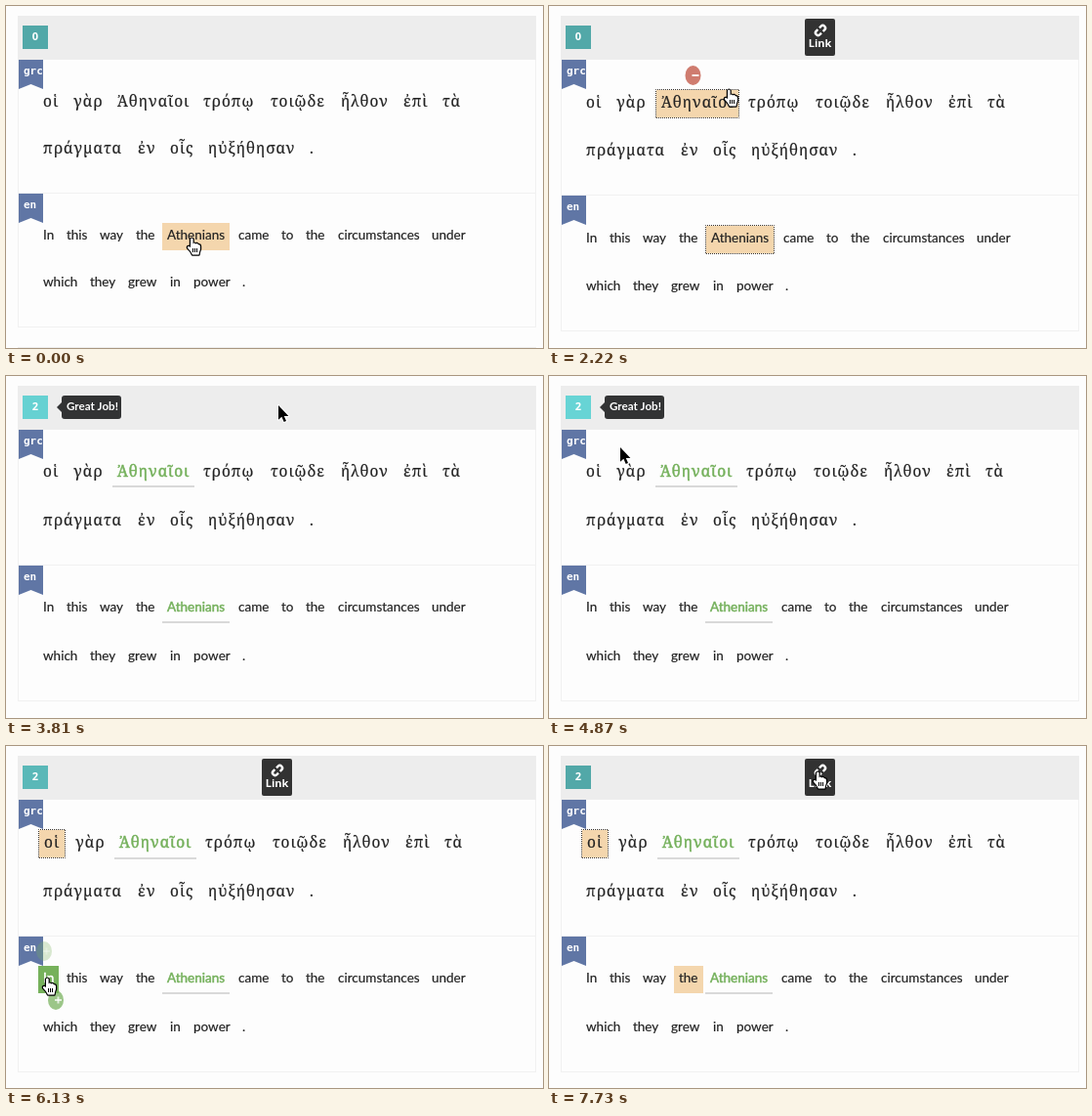
An HTML page with a canvas that plays this animation: 550x350 px, repeating every 8000 ms.

```html
<!DOCTYPE html>
<html lang="en">
<head>
<meta charset="utf-8">
<style>
html, body { margin: 0; overflow: hidden; background: #fdfdfd; }
canvas { display: block; }
</style>
</head>
<body>
<canvas id="stage" width="550" height="350"></canvas>
<script>
const c = document.getElementById('stage').getContext('2d');
const LOOP = 8000, STEP = LOOP / 90;
const TAN = '#f4d6ad', GREEN = '#76b15b', RED = '#c8695a', INK = '#222';
const GREEK = '15.4px "Noto Serif", serif', LATIN = '13.5px Lato, sans-serif';

const lines = (...rows) => rows.flatMap((row, line) =>
  row.split(' ').map(s => { const [x, text] = s.split(':'); return { x: +x, text, line }; }));
const grc = lines('38:οἱ 69:γὰρ 114:Ἀθηναῖοι 202:τρόπῳ 271:τοιῷδε 343:ἦλθον 407:ἐπὶ 447:τὰ',
  '38:πράγματα 135:ἐν 168:οἷς 207:ηὐξήθησαν 311:.');
const en = lines('38:In 62:this 96:way 133:the 165:Athenians 238:came 282:to 307:the 340:circumstances 436:under',
  '38:which 86:they 125:grew 168:in 192:power 242:.');
const people = grc[2], oi = grc[0], inWord = en[0], the = en[3], athenians = en[4], which = en[10];

// word, style, start, end
const marks = [
  [athenians, 'tan', 0, 175], [athenians, 'sel', 175, 3005], [athenians, 'linked', 3005, LOOP],
  [people, 'green', 890, 1600], [people, 'sel', 1600, 3005], [people, 'linked', 3005, LOOP],
  [oi, 'tan', 4960, 5315], [oi, 'sel', 5315, LOOP],
  [which, 'green', 5680, 6030], [inWord, 'green', 6030, 6330],
  [the, 'green', 6560, 6910], [the, 'tan', 6910, LOOP]
];
// word, sign, start, end
const badges = [
  [athenians, '-', 175, 720], [people, '+', 880, 1600], [people, '-', 1600, 2220],
  [oi, '-', 5315, 5600], [which, '+', 5680, 6080], [inWord, '+', 6050, 6290],
  [the, '+', 6560, 6910], [the, '-', 6910, 7020]
];
// time, x, y of the pointer tip
const path = [
  [0, 190, 237], [640, 190, 237], [980, 130, 93], [1260, 131, 93], [1340, 137, 95],
  [2140, 137, 95], [2480, 303, 60], [2660, 279, 32], [3010, 279, 32], [3100, 279, 30],
  [3990, 279, 30], [4510, 77, 70], [4780, 77, 70], [5050, 43, 95], [5430, 43, 95],
  [5615, 55, 266], [5790, 58, 291], [5970, 52, 280], [6130, 42, 237], [6230, 42, 237],
  [6430, 34, 94], [6600, 136, 252], [6740, 140, 236], [7000, 140, 236], [7460, 288, 56],
  [7640, 281, 39], [7730, 275, 26]
];
const arrowTimes = [[3090, 4960], [5490, 5680], [6500, 6560]];
const arrow = new Path2D('M0 0V14.8L3.4 11.8L5.7 17L8 16L5.8 11H10.4Z');
const hand = new Path2D('M4 10V1.6Q5.3 -.4 6.6 1.6V6.5Q7.4 4.8 9.3 6.4Q11.2 5.4 11.8 7.2Q14 6.8 14 9V12Q13 14 12.5 17.5H6Q5 14.5 1 10.7Q.5 8.5 2.4 9Z');

const clamp = v => Math.max(0, Math.min(1, v));
const ramp = (t, a, b) => clamp((t - a) / (b - a));
const during = (t, a, b) => t >= a && t < b;

function rect(x, y, w, h, color, r = 0) {
  c.fillStyle = color;
  c.beginPath();
  c.roundRect(x, y, w, h, r);
  c.fill();
}

function label(text, x, y, font, color, align = 'left', weight = 0) {
  c.font = font;
  c.textAlign = align;
  c.fillStyle = c.strokeStyle = color;
  c.fillText(text, x, y);
  if (weight) { c.lineWidth = weight; c.strokeText(text, x, y); }
}

function pointer(t) {
  const i = path.findIndex(p => p[0] > t);
  if (i < 0) return path[path.length - 1].slice(1);
  const [a, x, y] = path[i - 1], [b, x2, y2] = path[i];
  const k = ramp(t, a, b);
  return [x + (x2 - x) * k, y + (y2 - y) * k];
}

function flag(y, text) {
  c.fillStyle = '#6076a5';
  c.beginPath();
  [[13, 0], [38, 0], [38, 30], [25.5, 25], [13, 30]].forEach(([x, dy]) => c.lineTo(x, y + dy));
  c.fill();
  c.save();
  c.beginPath();
  c.rect(13, y, 25, 30);
  c.clip();
  label(text, 18, y + 14.5, 'bold 11px "DejaVu Sans Mono", monospace', '#fff');
  c.restore();
}

// Draws one language block and returns how much taller it became.
function block(words, t, base, font, greek) {
  const style = w => (marks.find(m => m[0] === w && during(t, m[2], m[3])) || [])[1];
  const styles = words.map(style);
  const sel = styles.indexOf('sel'), linked = styles.includes('linked');
  const lift = sel < 0 ? 0 : 1, grow = (lift || linked ? 2 : 0) + (lift && linked ? 1 : 0);
  c.letterSpacing = greek ? '1px' : '0px';
  words.forEach((w, i) => {
    const s = styles[i];
    const shift = lift && !w.line ? (i > sel ? 2 : i === sel ? 1 : 0) : 0;
    const x = w.x + shift, y = base + (w.line ? 48 + grow : lift);
    c.font = font;
    const width = Math.round(c.measureText(w.text).width) + 10;
    const left = x - 5, top = y - (greek ? 18 : 17);
    w.mid = left + width / 2;
    w.top = top;
    if (s === 'linked') rect(left, top + 27 + lift, width, 2, '#d9d9d9');
    else if (s) rect(left, top, width, 28, s === 'green' ? GREEN : TAN);
    if (s === 'sel') {
      c.strokeStyle = '#3a332c';
      c.lineWidth = 1;
      c.setLineDash([1, 1]);
      c.lineDashOffset = .5;
      c.strokeRect(left - .5, top - .5, width + 1, 29);
      c.setLineDash([]);
    }
    const color = s === 'green' ? '#fff' : s === 'linked' ? '#74b05b' : INK;
    const bold = s === 'green' || s === 'linked';
    label(w.text, x, y, font, color, 'left', bold ? .5 : .2);
  });
  c.letterSpacing = '0px';
  return grow;
}

function badge([w, sign, on, off], t) {
  const rise = sign === '-' ? +(t >= on) : ramp(t, on, on + 325);
  const a = Math.min(rise, 1 - ramp(t, off, off + 325));
  if (!a) return;
  const x = w.mid - 4.5, y = w.top - 15;
  c.globalAlpha = a * .92;
  c.fillStyle = sign === '+' ? GREEN : RED;
  c.beginPath();
  c.ellipse(x, y, 8, 10, 0, 0, 7);
  c.fill();
  rect(x - 1, y - 1, 7, 2, '#fff');
  if (sign === '+') rect(x + 1.5, y - 3.5, 2, 7, '#fff');
  c.globalAlpha = 1;
}

function linkButton() {
  rect(262, 13, 31, 38, '#323232', 2);
  c.save();
  c.translate(278, 25);
  c.rotate(-Math.PI / 4);
  c.strokeStyle = '#fff';
  c.lineWidth = 2.4;
  for (const side of [-1, 1]) {
    c.beginPath();
    c.moveTo(side * 1.2, -2.6);
    c.lineTo(side * 3.4, -2.6);
    c.arc(side * 3.4, 0, 2.6, -Math.PI / 2, Math.PI / 2, side < 0);
    c.lineTo(side * 1.2, 2.6);
    c.stroke();
  }
  c.restore();
  label('Link', 277.5, 42, 'bold 11px "Open Sans", sans-serif', '#fff', 'center');
}

function tooltip(alpha) {
  c.globalAlpha = alpha;
  rect(57, 20, 61, 24, '#323334', 3);
  c.beginPath();
  c.moveTo(52, 32); c.lineTo(57, 27); c.lineTo(57, 37);
  c.fill();
  label('Great Job!', 62, 35, 'bold 11.6px Lato, sans-serif', '#fff');
  c.globalAlpha = 1;
}

function cursor(t) {
  const [x, y] = pointer(t);
  const isArrow = arrowTimes.some(([a, b]) => during(t, a, b));
  const shape = isArrow ? arrow : hand;
  c.save();
  c.translate(Math.round(x) - (isArrow ? 0 : 5), Math.round(y));
  c.lineJoin = 'round';
  c.strokeStyle = isArrow ? '#fff' : '#000';
  c.lineWidth = isArrow ? 2 : 2.4;
  c.stroke(shape);
  c.fillStyle = isArrow ? '#000' : '#fff';
  c.fill(shape);
  if (!isArrow) for (const dx of [6, 8, 10]) rect(dx, 11, 1, 4, '#000');
  c.restore();
}

function draw(t) {
  rect(0, 0, 550, 350, '#fdfdfd');
  rect(12, 10, 531, 45, '#ededed');

  const glow = ramp(t, 3010, 3900) * (1 - ramp(t, 5860, 6310));
  const mix = (a, b) => Math.round(a + (b - a) * glow);
  rect(17, 20, 26, 24, `rgb(${mix(82, 103)},${mix(168, 212)},${mix(168, 213)})`);
  label(t < 3005 ? '0' : '2', 30, 35, 'bold 11px "Open Sans", sans-serif', '#fff', 'center');
  if (t >= 3005 && t < 5950) tooltip(1 - ramp(t, 5680, 5950));
  if (during(t, 175, 3005) || t >= 5315) linkButton();

  flag(55, 'grc');
  const dy = block(grc, t, 103, GREEK, true);
  const split = 191 + dy;
  flag(split + 1, 'en');
  const bottom = 328 + dy + block(en, t, 239 + dy, LATIN, false);
  const edge = '#f1f1f1';
  rect(12, split, 531, 1, edge);
  rect(12, bottom, 531, 1, edge);
  rect(12, 55, 1, bottom - 55, edge);
  rect(542, 55, 1, bottom - 55, edge);
  rect(12, bottom + 21, 531, 45, '#ededed');

  badges.forEach(b => badge(b, t));
  cursor(t);
}

function tick(now) {
  const t = now % LOOP;
  draw(Math.floor(t / STEP + .2) * STEP % LOOP + 15);
  requestAnimationFrame(tick);
}
requestAnimationFrame(tick);
</script>
</body>
</html>
```
